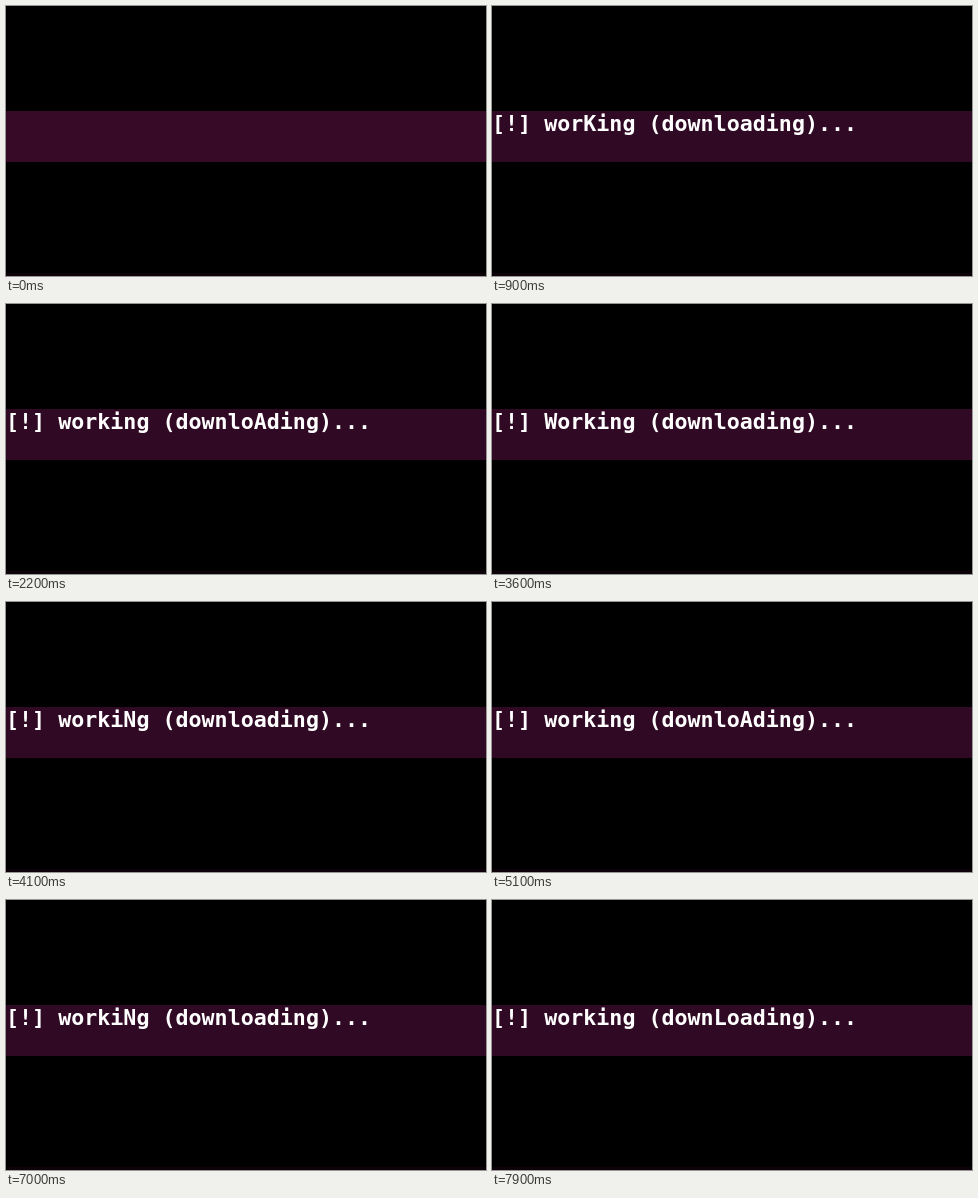
These frames come from a looping animation (480 by 270 pixels, 8 s). An HTML page:

```html
<!DOCTYPE html>
<html lang="en">
<head>
<meta charset="utf-8">
<title>Working</title>
<style>
html, body { margin: 0; width: 100%; height: 100%; overflow: hidden; background: #000; }
svg { display: block; width: 100vw; height: 100vh; }
text { font: bold 21.67px "DejaVu Sans Mono", monospace; fill: #fff; white-space: pre; }
</style>
</head>
<body>
<svg viewBox="0 0 480 270">
  <rect width="480" height="270" fill="#000"/>
  <rect id="band" y="105" width="480" height="51"/>
  <rect y="267" width="480" height="3" fill="#0d020a"/>
  <text id="line" x="0" y="125" xml:space="preserve"></text>
</svg>
<script>
const LOOP = 8000, STEP = 100, START = 500;
const CYCLE = 29;              // 28 characters and one pause
const HOLDS = [1800, 7500];    // times at which the wave rests for one step
const MESSAGE = "[!] working (downloading)...";
const band = document.getElementById("band");
const line = document.getElementById("line");

function capitalAt(t) {
  const rests = HOLDS.filter(h => t >= h).length;
  return (Math.floor(t / STEP) - 2 - rests) % CYCLE;
}

function render(t) {
  const on = t >= START;
  const i = capitalAt(t);
  const text = on
    ? MESSAGE.slice(0, i) + MESSAGE.charAt(i).toUpperCase() + MESSAGE.slice(i + 1)
    : "";
  if (line.textContent !== text) line.textContent = text;
  band.setAttribute("fill", on ? "#300a24" : "#370b28");
}

const begin = performance.now();
function tick() {
  render((performance.now() - begin) % LOOP);
  requestAnimationFrame(tick);
}
tick();
</script>
</body>
</html>
```
